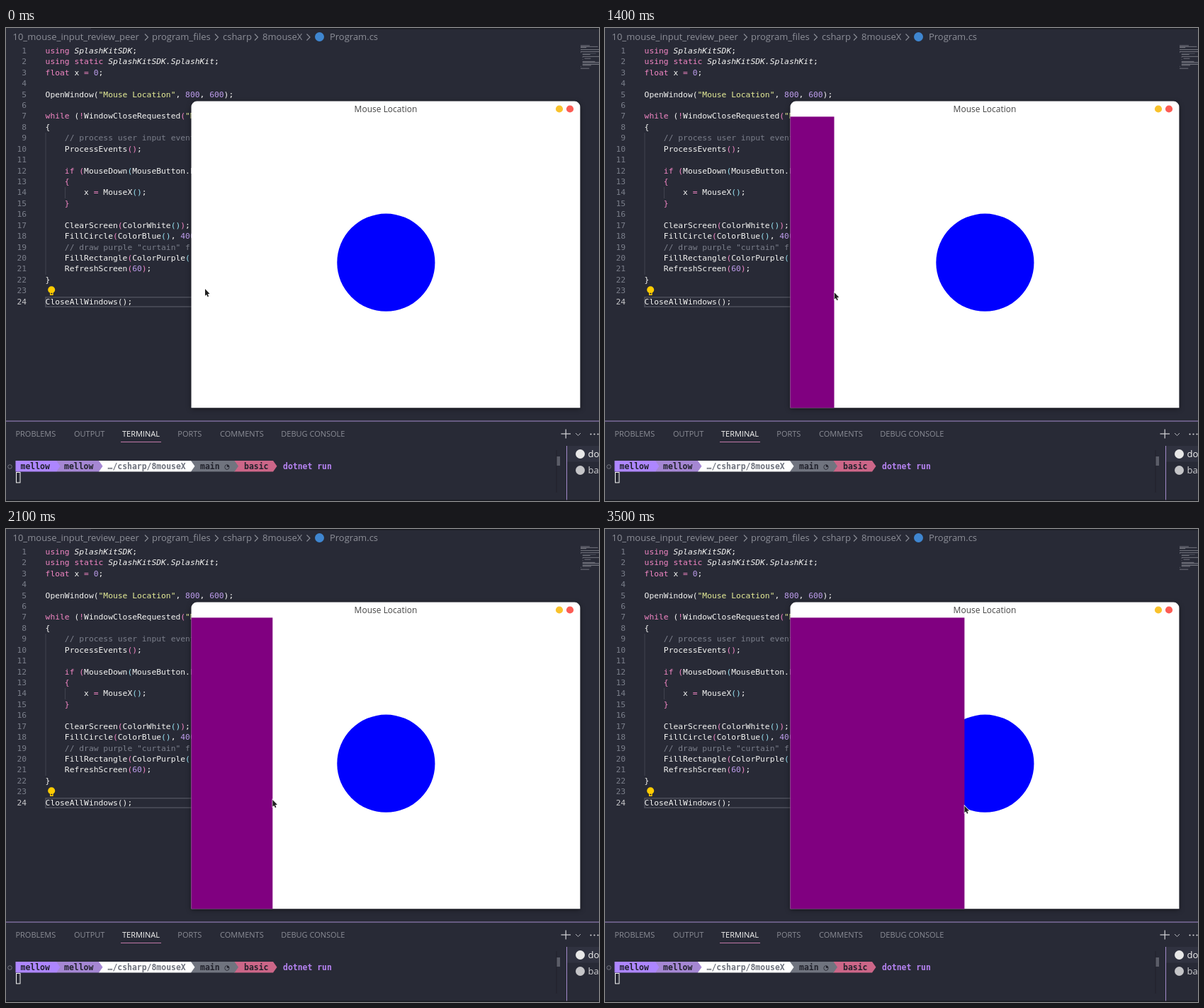
These frames come from a looping animation (837x669 px, 4200 ms). An HTML page with a canvas:

```html
<!DOCTYPE html>
<html lang="en">
<head>
<meta charset="utf-8">
<title>Mouse Location</title>
<style>
  html, body { margin: 0; width: 100%; height: 100%; overflow: hidden; background: #282a36; }
  canvas { display: block; }
</style>
</head>
<body>
<canvas id="stage" width="837" height="669"></canvas>
<script>
const ctx = document.getElementById('stage').getContext('2d');

const MONO = '"DejaVu Sans Mono", monospace';
const SANS = '"Open Sans", sans-serif';
const color = {
  back: '#282a36', text: '#f6f6f4', dim: '#7b7f8b', pink: '#f286c4',
  cyan: '#97e1f1', purple: '#bf9eee', yellow: '#e7ee98', dark: '#191a21',
  border: '#a48bcb'
};

const code = `using SplashKitSDK;
using static SplashKitSDK.SplashKit;
float x = 0;

OpenWindow("Mouse Location", 800, 600);

while (!WindowCloseRequested("Mouse Location"))
{
    // process user input events
    ProcessEvents();

    if (MouseDown(MouseButton.LeftButton))
    {
        x = MouseX();
    }

    ClearScreen(ColorWhite());
    FillCircle(ColorBlue(), 400, 300, 100);
    // draw purple "curtain" from left
    FillRectangle(ColorPurple(), 0, 0, x, 600);
    RefreshScreen(60);
}

CloseAllWindows();`.split('\n');

const LINE = 15.43;
const LOOP = 4200;
const HOLD = 700;
// Pointer tip and curtain edge; the button is up in the first pose.
const poses = [
  { x: 281, y: 369, edge: 261.5 },
  { x: 290, y: 373, edge: 290 },
  { x: 323.7, y: 374, edge: 323.5 },
  { x: 376.3, y: 383, edge: 376.3 },
  { x: 442.8, y: 384, edge: 442.8 },
  { x: 507.4, y: 391.5, edge: 507.4 }
];

function rect(x, y, w, h, fill) {
  ctx.fillStyle = fill;
  ctx.fillRect(x, y, w, h);
}

function disc(x, y, r, fill) {
  ctx.fillStyle = fill;
  ctx.beginPath();
  ctx.arc(x, y, r, 0, Math.PI * 2);
  ctx.fill();
}

function path(points, stroke, width = 1) {
  ctx.strokeStyle = stroke;
  ctx.lineWidth = width;
  ctx.beginPath();
  points.forEach(([x, y]) => ctx.lineTo(x, y));
  ctx.stroke();
}

function text(str, x, y, font, fill, align = 'left') {
  ctx.font = font;
  ctx.fillStyle = fill;
  ctx.textAlign = align;
  ctx.fillText(str, x, y);
}

function drawBreadcrumbs() {
  rect(120, 0, 717, 1.5, color.dark);
  const parts = [['10_mouse_input_review_peer', 9.5], ['program_files', 206],
    ['csharp', 306], ['8mouseX', 362], ['Program.cs', 457]];
  for (const [label, x] of parts) text(label, x, 17, '13px ' + SANS, '#8d8f98');
  for (const x of [196, 295, 351, 424.5])
    path([[x, 8.5], [x + 4.5, 13], [x, 17.5]], '#8d8f98', 1.1);
  disc(442.5, 12.5, 6.5, '#3f86d0');
}

function drawCode() {
  const font = '11.32px ' + MONO;
  const token = /\/\/.*|"[^"]*"|\b(?:using|static|float|while|if)\b|SplashKit[\w.]*|\d+|[(){}]|[=!]|[\w.]+|[;,]/g;
  const brackets = [color.text, color.pink, color.cyan];
  let depth = 0;

  rect(55.5, 148, 1, 201, '#40424e');
  rect(83, 225, 1, 16, '#40424e');
  ctx.strokeStyle = '#4b4d59';
  ctx.lineWidth = 1.6;
  ctx.strokeRect(56, 380.8, 748, 13.4);

  ctx.font = font;
  const advance = ctx.measureText('0').width;
  code.forEach((line, row) => {
    const y = 35.8 + row * LINE;
    const current = row === code.length - 1;
    text(row + 1, 29, y, font, current ? '#c8c8cb' : color.dim, 'right');
    for (const match of line.matchAll(token)) {
      const word = match[0];
      let fill = color.text;
      if (word.startsWith('//')) fill = color.dim;
      else if (word[0] === '"') fill = color.yellow;
      else if (/^\d/.test(word)) fill = color.purple;
      else if (/^(using|static|float|while|if|=|!)$/.test(word)) fill = color.pink;
      else if (/[({]/.test(word)) fill = brackets[depth++];
      else if (/[)}]/.test(word)) fill = brackets[--depth];
      const style = word.startsWith('SplashKit') ? 'italic ' : '';
      text(word, 55.6 + match.index * advance, y, style + font, fill);
    }
  });

  disc(64.2, 370.3, 5, '#fc0');
  rect(62, 373, 4.6, 5, '#fc0');
  rect(63.2, 374.8, 2.2, 1.6, color.back);
}

function drawMinimap() {
  code.forEach((line, row) => {
    const indent = line.search(/\S/);
    if (indent < 0) return;
    const fill = line.includes('//') ? '#555863' : '#85868f';
    rect(811 + indent * 0.68, 24.5 + row * 1.4, (line.length - indent) * 0.68, 0.8, fill);
  });
}

function arrowSegment(left, right, fill) {
  ctx.fillStyle = fill;
  ctx.beginPath();
  ctx.moveTo(left, 612);
  ctx.lineTo(right, 612);
  ctx.lineTo(right + 5.5, 619.75);
  ctx.lineTo(right, 627.5);
  ctx.lineTo(left, 627.5);
  ctx.fill();
}

function drawPanel() {
  rect(0, 555.5, 837, 1, color.border);
  const tabs = [['PROBLEMS', 13.4], ['OUTPUT', 96], ['TERMINAL', 164],
    ['PORTS', 242.3], ['COMMENTS', 302], ['DEBUG CONSOLE', 388.3]];
  for (const [label, x] of tabs)
    text(label, x, 578, '11px ' + SANS, label === 'TERMINAL' ? color.text : '#8b8d96');
  rect(162, 585, 57, 1, '#c078a8');

  path([[783.5, 574], [797, 574]], '#d5d5d8', 1.2);
  path([[790.2, 567.5], [790.2, 580.5]], '#d5d5d8', 1.2);
  path([[804, 573], [807.5, 576.5], [811, 573]], '#b5b6bc');
  for (const x of [825.5, 830.5, 835.5]) disc(x, 574.5, 1.1, '#d5d5d8');

  ctx.strokeStyle = '#73757f';
  ctx.lineWidth = 1;
  ctx.beginPath();
  ctx.arc(5.5, 620.5, 2.8, 0, Math.PI * 2);
  ctx.stroke();

  arrowSegment(322, 377, '#cc6688');
  arrowSegment(261, 322.5, '#70747f');
  arrowSegment(131, 261, '#ffffff');
  arrowSegment(71, 131, '#a587d3');
  arrowSegment(13.5, 71, '#ad86ff');
  const prompt = [['mellow', 20.5, '#20212b'], ['mellow', 82, '#20212b'],
    ['…/csharp/8mouseX', 143.5, '#6c707b'], ['main ◔', 274, '#20212b'],
    ['basic', 336, '#20212b'], ['dotnet run', 391, '#b683f2']];
  for (const [label, x, fill] of prompt)
    text(label, x, 623.7, 'bold 11.45px ' + MONO, fill);
  ctx.strokeStyle = color.text;
  ctx.strokeRect(14.5, 628.5, 5.5, 14.5);

  rect(776.5, 597, 1, 60, '#20212b');
  rect(777.5, 606, 4.5, 13, '#5b5d68');
  rect(792, 591, 45, 22.5, '#303240');
  rect(791, 591, 1, 78, color.border);
  disc(810.5, 602.5, 6.5, '#e8e8e8');
  disc(810.5, 625.5, 6.5, '#c5c5c8');
  text('dotnet', 821.5, 607, '13px ' + SANS, color.text);
  text('bash', 821.5, 629.5, '13px ' + SANS, '#d0d0d3');
  rect(0, 667.5, 837, 1.5, color.dark);
}

function drawPointer(x, y) {
  const outline = [[0, 0], [0, 9.8], [2.1, 7.9], [3.6, 11.3], [5.1, 10.6], [3.7, 7.3], [6.6, 7]];
  ctx.beginPath();
  outline.forEach(([dx, dy]) => ctx.lineTo(x + dx, y + dy));
  ctx.closePath();
  ctx.strokeStyle = '#fff';
  ctx.lineWidth = 1.3;
  ctx.stroke();
  ctx.fillStyle = '#202020';
  ctx.fill();
}

function drawWindow({ x, y, edge }) {
  ctx.save();
  ctx.shadowColor = 'rgba(0, 0, 0, 0.5)';
  ctx.shadowBlur = 6;
  ctx.shadowOffsetY = 1.5;
  ctx.fillStyle = '#fff';
  ctx.beginPath();
  ctx.roundRect(261.5, 103.6, 548.9, 433.7, [8, 8, 0, 0]);
  ctx.fill();
  ctx.restore();

  text('Mouse Location', 536, 118.5, '12px ' + SANS, '#454545', 'center');
  disc(781, 114.5, 5.1, '#f9c22b');
  disc(796, 114.5, 5.1, '#fc5c54');
  disc(536.4, 331.7, 69.1, '#00f');
  rect(261.5, 125.4, edge - 261.5, 411.9, '#800080');
  drawPointer(x, y);
}

function draw(pose) {
  rect(0, 0, 837, 669, color.back);
  drawBreadcrumbs();
  drawCode();
  drawMinimap();
  drawPanel();
  drawWindow(pose);
}

let shown;
function tick() {
  const pose = poses[Math.floor(performance.now() % LOOP / HOLD)];
  if (pose !== shown) draw(shown = pose);
  requestAnimationFrame(tick);
}
tick();
</script>
</body>
</html>
```
